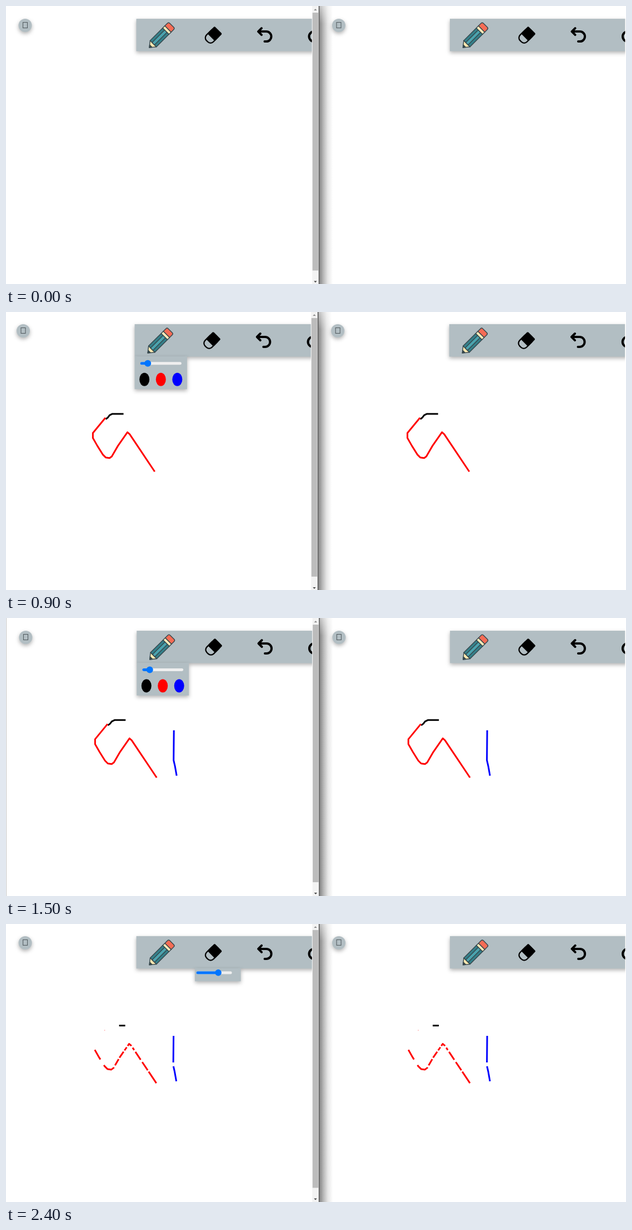
An HTML page that plays this animation: 1116 px wide and 502 px high, repeating every 2.7 s.

```html
<!DOCTYPE html>
<html lang="en">
<head>
<meta charset="utf-8">
<title>Shared whiteboard</title>
<style>
  html, body { margin: 0; width: 100%; height: 100%; overflow: hidden; background: #fff; }
  svg { display: block; width: 1116px; height: 502px; }
  .panel { fill: #b2bec3; filter: drop-shadow(0 3px 3.5px rgba(0,0,0,.3)); }
  .line { fill: none; stroke: #000; }
  .ink { fill: none; stroke-width: 3; stroke-linejoin: round; }
  .track { fill: none; stroke-width: 5; stroke-linecap: round; }
</style>
</head>
<body>
<svg viewBox="0 0 1116 502">
  <defs>
    <linearGradient id="shade">
      <stop offset="0" stop-color="#858585"/>
      <stop offset=".3" stop-color="#b9b9b9"/>
      <stop offset=".62" stop-color="#e6e6e6"/>
      <stop offset="1" stop-color="#fff"/>
    </linearGradient>
    <linearGradient id="fade" x2="0" y2="1">
      <stop offset="0" stop-color="#fff" stop-opacity=".6"/>
      <stop offset="1" stop-color="#fff" stop-opacity="0"/>
    </linearGradient>

    <g id="board">
      <path id="blue" class="ink" stroke="#00f" data-from="4" d="M302 202 301.5 256 304 267 307 284"/>
      <path id="black" class="ink" stroke="#000" data-from="2" d="M215 183.5H195L190 186 187 190 183 193"/>
      <path id="red" class="ink" stroke="#f00" data-from="3"
        d="M182.5 190.5 160 218V227L168 241 178 257 183 262 190 263 194 260 205 241 222 216.5 226 220 238 238 271 287.5"/>
      <circle cx="178" cy="192" r=".8" fill="#f99" data-from="7"/>

      <circle class="panel" cx="35" cy="34" r="12"/>
      <rect x="31" y="28.5" width="8" height="10" fill="none" stroke="#4d565a"/>
      <rect class="panel" x="235" y="22" width="420" height="58.5"/>

      <g transform="translate(258.5 74) rotate(-45)" stroke="#36474c" stroke-width="1.4" stroke-linejoin="round">
        <path d="M0 0 10-8V8Z" fill="#fbe8b0"/>
        <path d="M10-8H42V8H10Z" fill="#35808a"/>
        <path d="M10-3H42V3H10Z" fill="#4ba3ae"/>
        <path d="M42-8H47.5V8H42Z" fill="#fdeab8"/>
        <path d="M47.5-8H54Q57-8 57-5V5Q57 8 54 8H47.5Z" fill="#f56c55"/>
        <path d="M0 0 4-3V3Z" fill="#36474c"/>
      </g>

      <g transform="translate(376 49) rotate(-45)">
        <rect class="line" x="-19" y="-8.7" width="27" height="17.4" rx="7" stroke-width="2.3"/>
        <rect x="-9" y="-9.7" width="18.5" height="19.4" rx="2"/>
      </g>

      <path class="line" stroke-width="4" stroke-linecap="round" stroke-linejoin="round"
        d="M460.5 39 454.5 45 460.5 51M455 45H469A9 9 0 0 1 469 63H466"/>
      <path class="line" stroke-width="4" d="M555 45A9 9 0 0 0 555 63"/>
    </g>
  </defs>

  <g id="scene">
    <use href="#board"/>
    <g data-from="1" data-to="5">
      <rect class="panel" x="235" y="80" width="94" height="59"/>
      <path class="track" stroke="#efefef" d="M247.5 92.5H316.5"/>
      <path class="track" stroke="#0075ff" d="M247.5 92.5H258"/>
      <circle cx="258.5" cy="92.5" r="6" fill="#0075ff"/>
      <ellipse cx="252.5" cy="121.5" rx="9" ry="12"/>
      <ellipse cx="282" cy="121.5" rx="9" ry="12" fill="#f00"/>
      <ellipse cx="311.5" cy="121.5" rx="9" ry="12" fill="#00f"/>
    </g>
    <g data-from="6">
      <rect class="panel" x="340.5" y="80" width="82.5" height="23.5"/>
      <path class="track" stroke="#efefef" d="M345.5 88H404.5"/>
      <path id="level" class="track" stroke="#0075ff"/>
      <circle id="knob" cy="88" r="5.8" fill="#0075ff"/>
    </g>
    <rect x="-1" y="-9" width="1" height="520" fill="#8c8c8c"/>

    <g transform="translate(551.7)">
      <rect x="-.5" y="-9" width="120" height="520" fill="#fff"/>
      <rect y="-9" width="11.5" height="520" fill="#f3f3f3"/>
      <rect x=".5" y="11" width="10.5" height="465.5" fill="#bcbcbc"/>
      <path d="M3 7 5.7 4 8.4 7Z" fill="#8a8a8a"/>
      <path d="M3 495.5H8.4L5.7 498.5Z" fill="#484848"/>
      <rect x="13" y="-9" width="24" height="520" fill="url(#shade)"/>
      <rect x="13" y="-9" width="24" height="40" fill="url(#fade)"/>
      <rect x="11.6" y="-9" width="1.5" height="520" fill="#4c4c4c"/>
    </g>
    <use href="#board" x="564.5"/>
    <rect x="1115" y="-9" width="9" height="520" fill="#fff"/>
  </g>
</svg>

<script>
const $ = id => document.getElementById(id);
const STEP = 300, STEPS = 9;

// Hand-held camera: step, x, y, zoom
const camera = [
  [0, -.5, 1.1, 1],
  [1, 1, -.9, 1],
  [3, -4.1, -.1, 1.003],
  [4, 1, 2.1, .998],
  [6, 0, 0, 1],
  [8, -.4, -.1, 1]
];

function cameraAt(step) {
  const next = Math.max(1, camera.findIndex(key => key[0] >= step));
  const a = camera[next - 1], b = camera[next];
  const k = (step - a[0]) / (b[0] - a[0]);
  return a.map((v, i) => v + (b[i] - v) * k).slice(1);
}

// Visible and erased lengths along each stroke
const dashes = {
  black: step => step > 6 ? '11 99' : 'none',
  red: step => step > 7 ? '0 45 20 12 23 4 13 3 13 3 7 3 10 4 5 4 17 5 18 3 99'
    : step > 6 ? '0 45 999' : 'none',
  blue: step => step > 7 ? '48 7 99' : step < 5 ? '16.5 999' : 'none'
};

const timed = document.querySelectorAll('[data-from]');

function draw(step) {
  const [x, y, zoom] = cameraAt(step);
  $('scene').setAttribute('transform', `translate(${x} ${y}) scale(${zoom})`);
  for (const el of timed) {
    const { from, to = STEPS } = el.dataset;
    el.setAttribute('display', step >= from && step <= to ? 'inline' : 'none');
  }
  for (const id in dashes) $(id).setAttribute('stroke-dasharray', dashes[id](step));
  const level = step > 6 ? 382.5 : 354.5;
  $('knob').setAttribute('cx', level);
  $('level').setAttribute('d', `M345.5 88H${level}`);
}

let start, last = -1;
function tick(now) {
  start ??= now;
  const step = Math.floor((now - start) / STEP) % STEPS;
  if (step !== last) draw(last = step);
  requestAnimationFrame(tick);
}
draw(0);
requestAnimationFrame(tick);
</script>
</body>
</html>
```
